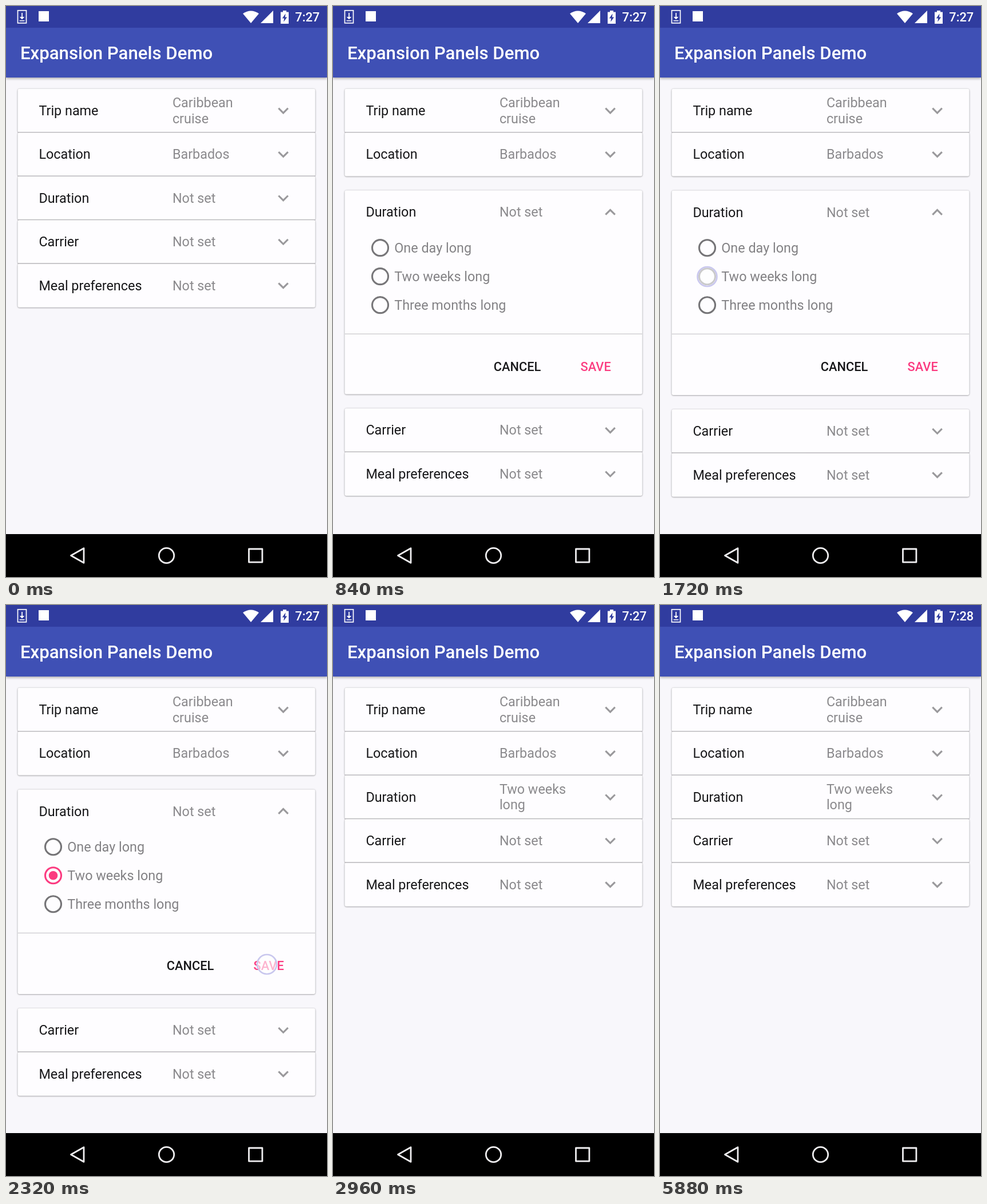
Recreate the animation shown at these times as an HTML page. Size 561 by 998 pixels, loop 5.92 s.

```html
<!DOCTYPE html>
<html lang="en">
<head>
<meta charset="utf-8">
<title>Expansion Panels Demo</title>
<style>
  html, body { margin: 0; width: 100%; height: 100%; overflow: hidden; background: #f8f7fb; }
  svg { display: block; width: 100%; height: 100%; }
  text { font-family: Roboto, "Noto Sans", sans-serif; font-size: 23.375px; fill: #161618; }
  .medium { font-weight: 500; font-size: 21.8px; }
  .title { font-weight: 500; font-size: 31.17px; fill: #fff; }
  .value { fill: #8b8a8d; }
  .option { fill: #828184; }
  .cards { fill: #fefdff; filter: drop-shadow(0 1.6px 1.1px rgba(0,0,0,.24)) drop-shadow(0 0 1px rgba(0,0,0,.22)); }
  .bar { filter: drop-shadow(0 2px 2px rgba(0,0,0,.3)); }
  .chevron { fill: #9a999c; }
  .ring { fill: none; stroke: #757477; stroke-width: 3.1; }
</style>
</head>
<body>
<svg id="stage" viewBox="0 0 561 998">
  <defs>
    <clipPath id="bodyClip"><rect id="bodyBox" x="20" width="521"/></clipPath>
    <clipPath id="valueClip"><rect id="valueBox" x="290"/></clipPath>
  </defs>
  <rect width="561" height="998" fill="#f8f7fb"/>
  <g id="cards" class="cards"></g>
  <g id="lines" fill="#bbbabd"></g>
  <g id="rows"></g>
  <g clip-path="url(#bodyClip)"><g id="body">
    <g id="options"></g>
    <rect x="20.5" y="250.2" width="520" height="1.5" fill="#d2d1d4"/>
    <text class="medium" x="280.8" y="315.6">CANCEL</text>
    <text class="medium" x="432.5" y="315.6" style="fill:#fb3b80">SAVE</text>
  </g></g>

  <rect class="bar" y="30" width="561" height="95" fill="#3f50b5"/>
  <rect width="561" height="38" fill="#303c9f"/>
  <text class="title" x="24.9" y="93">Expansion Panels Demo</text>
  <g fill="#fff">
    <rect x="20.5" y="7.8" width="15" height="22" fill="none" stroke="#fff" stroke-width="1.7"/>
    <path d="M27.2 12h1.7v7h3.3l-4.2 4.6-4.2-4.6h3.4zM23.6 25h8.8v1.6h-8.8z"/>
    <rect x="57" y="9" width="18" height="18"/>
    <path d="M414 13.2Q428 3.6 442 13.2L428 30Z"/>
    <path d="M445 30H467V8Z"/>
    <path d="M480 10.5h4V8h6v2.5h4V31h-14z"/>
    <path d="M488.6 13.2l-5.8 8.2h3.3l-.8 6.4 5.9-8.4h-3.4z" fill="#303c9f"/>
    <text class="medium" id="clock" x="505.3" y="27" style="fill:#fff">7:27</text>
  </g>

  <rect y="923" width="561" height="75"/>
  <g fill="none" stroke="#f0eff1" stroke-width="2.8" stroke-linejoin="round">
    <path d="M113.5 960.5L136 947.7V973.3Z"/>
    <circle cx="280.5" cy="960.5" r="13.2"/>
    <rect x="424.5" y="949" width="23.4" height="23.2"/>
  </g>
  <circle id="touch" r="17" fill="#fff" fill-opacity=".62" stroke="#c9c7ee" stroke-width="2.6"/>
</svg>
<script>
const LOOP = 5920, TICK = 40;
const TOP = 144.7, ROW = 76.4, GAP = 24.9, GROWTH = 281.2, LINE = 27.4;
const OPEN_AT = 659, CLOSE_AT = 2696, MOVE = 200;
const PICK_AT = 1800, PINK = '#fb3b80';
const CHEVRON = 'M4.59-3.41L0 1.17-4.59-3.41-6-2 0 4 6-2z';
const TOUCHES = [
  { x: 484, y: 336, from: 440, to: 680, ramp: 80 },
  { x: 82.5, y: 473, from: 1440, to: 1880, ramp: 140 },
  { x: 456, y: 628, from: 2040, to: 2640, ramp: 200 }
];

const $ = id => document.getElementById(id);
const clamp = v => Math.min(1, Math.max(0, v));

function add(parent, tag, attrs = {}, content = '') {
  const node = document.createElementNS('http://www.w3.org/2000/svg', tag);
  parent.append(node);
  node.textContent = content;
  return set(node, attrs);
}

function set(node, attrs) {
  for (const key in attrs) node.setAttribute(key, attrs[key]);
  return node;
}

// cubic-bezier(.4, 0, .2, 1)
function ease(x) {
  let lo = 0, hi = 1;
  for (let i = 0; i < 24; i++) {
    const s = (lo + hi) / 2, r = 1 - s;
    if (1.2 * s * r * r + .6 * s * s * r + s * s * s < x) lo = s; else hi = s;
  }
  return lo * lo * (3 - 2 * lo);
}

function addValue(parent, lines) {
  const group = add(parent, 'g');
  lines.forEach((line, i) => add(group, 'text', {
    class: 'value', x: 290.9, y: 8 + LINE * (i - (lines.length - 1) / 2)
  }, line));
  return group;
}

const rows = [
  ['Trip name', 'Caribbean', 'cruise'],
  ['Location', 'Barbados'],
  ['Duration', 'Not set'],
  ['Carrier', 'Not set'],
  ['Meal preferences', 'Not set']
].map(([label, ...value]) => {
  const group = add($('rows'), 'g');
  add(group, 'text', { x: 57.4, y: 8 }, label);
  return {
    group,
    value: addValue(group, value),
    chevron: add(group, 'path', { class: 'chevron', d: CHEVRON }),
    card: add($('cards'), 'rect', { x: 20.5, width: 520, rx: 3 }),
    line: add($('lines'), 'rect', { x: 20.5, width: 520, height: 1.5 })
  };
});
const duration = rows[2];
const clipHolder = add($('rows'), 'g', { 'clip-path': 'url(#valueClip)' });
const chosen = addValue(clipHolder, ['Two weeks', 'long']);

const radios = ['One day long', 'Two weeks long', 'Three months long'].map((label, i) => {
  const y = 100.4 + 50 * i;
  add($('options'), 'text', { class: 'option', x: 107.3, y: y + 8.4 }, label);
  return {
    ring: add($('options'), 'circle', { class: 'ring', cx: 82.5, cy: y, r: 14 }),
    dot: add($('options'), 'circle', { cx: 82.5, cy: y, r: 0, fill: PINK })
  };
});

function drawPanels(t) {
  const closing = t >= CLOSE_AT;
  const progress = closing ? 1 - clamp((t - CLOSE_AT) / MOVE) : clamp((t - OPEN_AT) / MOVE);
  const p = ease(progress);
  const expanded = t >= OPEN_AT && !closing;
  const shift = i => i < 2 ? 0 : i === 2 ? GAP * p : (2 * GAP + GROWTH) * p;

  rows.forEach((row, i) => {
    const top = TOP + ROW * i + shift(i);
    const height = ROW + (i === 2 ? GROWTH * p : 0);
    const joined = i === 0 || i === 3 || (i < 4 && p < .002);
    set(row.card, { y: top, height });
    set(row.line, { y: top + height - 1.1, visibility: joined ? 'visible' : 'hidden' });
    set(row.group, { transform: `translate(0 ${top + ROW / 2})` });
    const turn = i === 2 && expanded ? -1 : 1;
    set(row.chevron, { transform: `translate(484.6 0) scale(1.558 ${1.558 * turn})` });
  });

  const top = TOP + 2 * ROW + shift(2), center = top + ROW / 2, q = 1 - p;
  set(duration.value, { visibility: closing ? 'hidden' : 'visible' });
  set(clipHolder, { visibility: closing ? 'visible' : 'hidden' });
  set(chosen, { transform: `translate(0 ${center + LINE / 2 * (1 - q)})` });
  const clipHeight = LINE * (1 + q);
  set($('valueBox'), { y: center - clipHeight / 2, width: 77 + 72 * q, height: clipHeight });

  set($('bodyBox'), { y: top, height: ROW + GROWTH * p });
  set($('body'), {
    transform: `translate(0 ${top})`,
    opacity: expanded ? ease(clamp((progress - .4) / .6)) : 0
  });
}

function drawRadio(t) {
  const picked = t >= PICK_AT;
  radios[1].ring.style.stroke = picked ? PINK : '';
  set(radios[1].dot, { r: 7.8 * clamp((t - PICK_AT) / MOVE) });
}

function drawTouch(t) {
  const touch = TOUCHES.find(({ from, to }) => t > from && t < to);
  if (!touch) return set($('touch'), { opacity: 0 });
  const { x, y, from, to, ramp } = touch;
  set($('touch'), { cx: x, cy: y, opacity: clamp(Math.min(t - from, to - t) / ramp) });
}

function draw(time) {
  const t = Math.floor((time % LOOP) / TICK) * TICK;
  drawPanels(t);
  drawRadio(t);
  drawTouch(t);
  $('clock').textContent = t < 5800 ? '7:27' : '7:28';
}

const start = performance.now();
function loop() {
  draw(performance.now() - start);
  requestAnimationFrame(loop);
}
loop();
</script>
</body>
</html>
```
